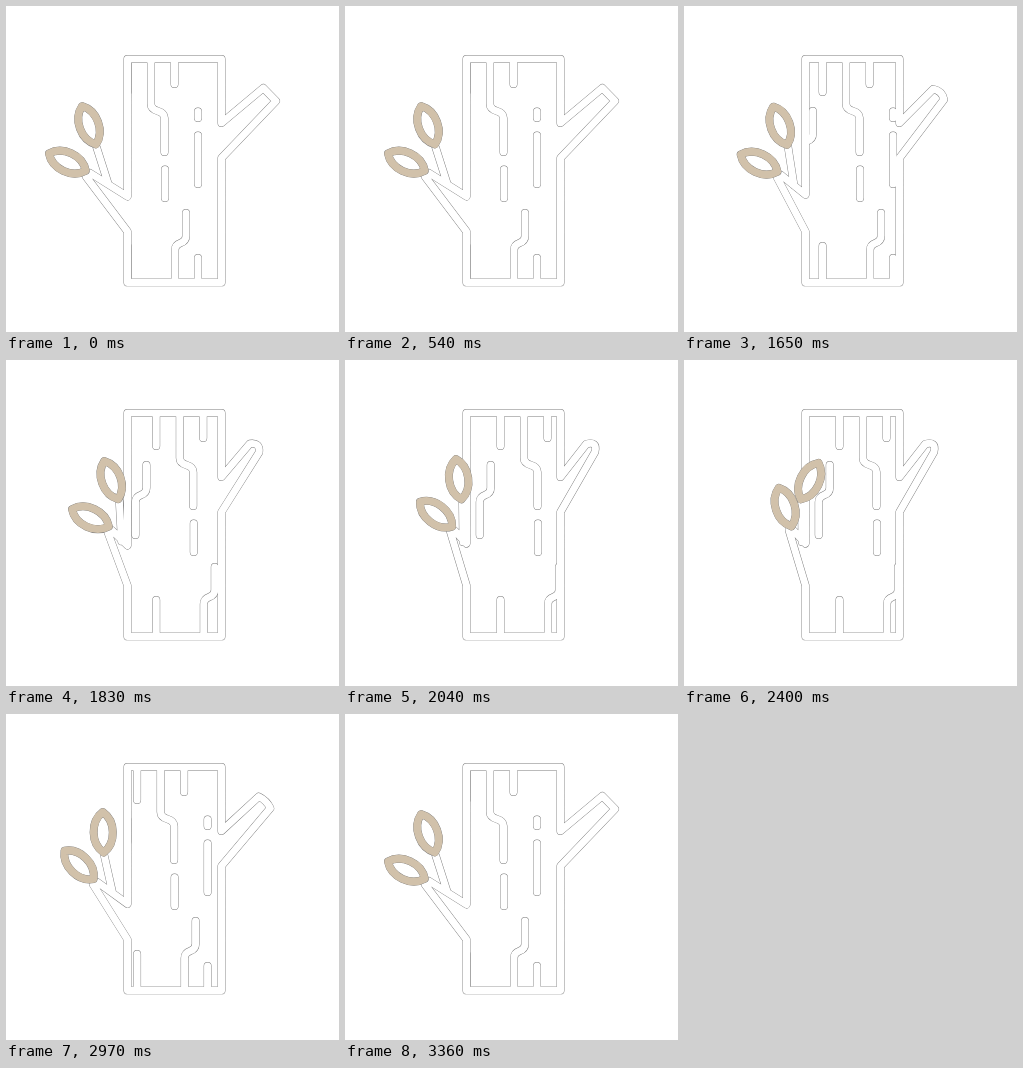
Write an HTML page with a canvas that moves like this. It is 333x326 px and loops after 3390 ms.

```html
<!DOCTYPE html>
<html lang="en">
<head>
<meta charset="utf-8">
<title>Turning log</title>
<style>
html, body { margin: 0; width: 100%; height: 100%; overflow: hidden; background: #fff; }
canvas { display: block; }
</style>
</head>
<body>
<canvas id="stage" width="333" height="326"></canvas>
<script>
const ctx = document.getElementById('stage').getContext('2d');
const LOOP = 3390;
const LEFT = 121.5, RIGHT = 215.5, TOP = 53, BOTTOM = 276.4;
const TRAVEL = 34;

function ease(t, start, end) {
  const u = Math.min(1, Math.max(0, (t - start) / (end - start)));
  return u * u * (3 - 2 * u);
}

function polyline(path, ...points) {
  points.forEach(([x, y], i) => i ? path.lineTo(x, y) : path.moveTo(x, y));
}

// A vertical groove that steps sideways by dx halfway down.
function steppedGroove(path, x, top, bend, dx, bottom) {
  path.moveTo(x, top);
  path.lineTo(x, bend);
  path.quadraticCurveTo(x, bend + 5, x + dx / 2, bend + 7);
  path.quadraticCurveTo(x + dx, bend + 9, x + dx, bend + 14);
  path.lineTo(x + dx, bottom);
}

function barkPath(shift) {
  const path = new Path2D();
  const grooves = [
    [168.5, TOP, 78], [159, 163.5, 192], [192, 105.5, 112],
    [192, 129.5, 178], [192, 252, BOTTOM],
    [121.5, TOP, 86], [121.5, 240, BOTTOM]
  ];
  for (const [x, top, bottom] of grooves) {
    polyline(path, [x + shift, top], [x + shift, bottom]);
  }
  steppedGroove(path, 145 + shift, TOP, 98, 13.5, 146);
  steppedGroove(path, 180 + shift, 207, 230, -11, BOTTOM);
  steppedGroove(path, 111.7 + shift, 105, 128, -11, 175);
  return path;
}

function logPath(p) {
  const path = new Path2D();
  const fork = 190.5 - 7 * p * p;
  polyline(path, [84 + 26 * p, 167 + 4 * p], [LEFT, fork], [LEFT, TOP], [RIGHT, TOP], [RIGHT, 117]);
  const a = [257.3 - 16 * p, 82 + 2 * p];
  const b = [270 - 20 * p, 95 - 3 * p];
  const bulge = 7 * p;
  path.lineTo(...a);
  path.quadraticCurveTo((a[0] + b[0]) / 2 + bulge, (a[1] + b[1]) / 2 - bulge, ...b);
  path.lineTo(RIGHT, 152);
  path.lineTo(RIGHT, BOTTOM);
  path.lineTo(LEFT, BOTTOM);
  path.lineTo(LEFT, 225.5);
  path.lineTo(80 + 25 * p, 170.5);
  polyline(path, [90.5 + 27 * p, 141], [102 + 16 * p, 177 + 5 * p]);
  return path;
}

function stroke(path, color, width) {
  ctx.strokeStyle = color;
  ctx.lineWidth = width;
  ctx.stroke(path);
}

const leafShape = new Path2D('M-20.3 0C-11 -12.8 11 -12.8 20.3 0C11 12.8 -11 12.8 -20.3 0Z');

function drawLeaf(x, y, degrees) {
  ctx.save();
  ctx.translate(x, y);
  ctx.rotate(degrees * Math.PI / 180);
  ctx.translate(-21, 0);
  ctx.fillStyle = '#fff';
  ctx.fill(leafShape);
  stroke(leafShape, '#777', 8);
  stroke(leafShape, '#d1c1aa', 7.5);
  ctx.restore();
}

function draw(t) {
  const p = ease(t, 1290, 2010) - ease(t, 2510, 3220);
  const sway = ease(t, 1830, 2460) - ease(t, 2620, 3240);
  const bark = barkPath(TRAVEL * p);
  const log = logPath(p);

  ctx.fillStyle = '#fff';
  ctx.fillRect(0, 0, 333, 326);
  ctx.lineCap = ctx.lineJoin = 'round';

  // Both outlines go down before both fills, so that joints merge.
  for (const [color, width] of [['#777', 7.9], ['#fff', 7.1]]) {
    ctx.save();
    ctx.beginPath();
    ctx.rect(LEFT, TOP, RIGHT - LEFT, BOTTOM - TOP);
    ctx.clip();
    stroke(bark, color, width);
    ctx.restore();
    stroke(log, color, width);
  }

  drawLeaf(90.2 + 26.3 * p, 139 + p, 70 + 47 * sway);
  drawLeaf(80.4 + 27.3 * p, 165 + 2 * p, 25 + 48 * sway);
}

function tick() {
  draw(performance.now() % LOOP);
  requestAnimationFrame(tick);
}
tick();
</script>
</body>
</html>
```
